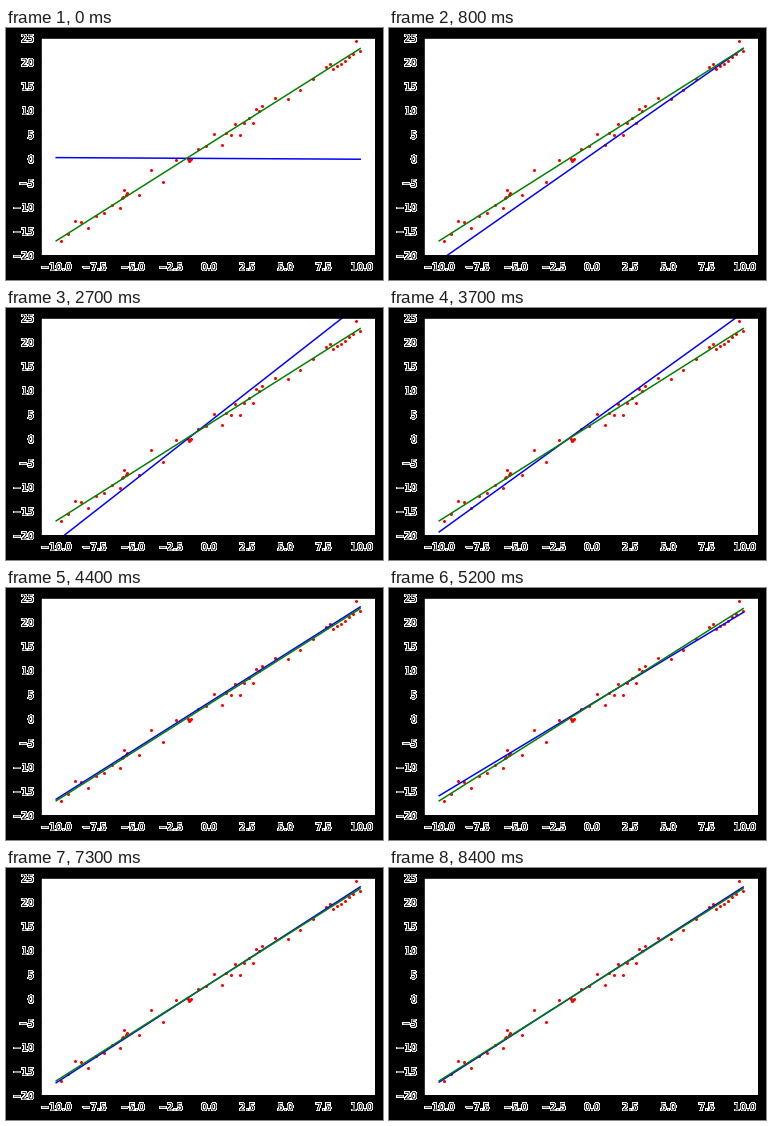
Animation, 377 px wide and 252 px high, one loop 8.5 s. Source, as a matplotlib script:

```python
import numpy as np
import matplotlib.pyplot as plt
from matplotlib.animation import FuncAnimation
from matplotlib.patheffects import withStroke

W, H, DPI = 377, 252, 72
FRAMES, STEP = 85, 100
LEFT, RIGHT, TOP, BOTTOM = 35.0, 369.4, 9.9, 227.34
SLOPE, BIAS = 2.013, 3.05


def samples(n=50):
    """Noisy points around y = 2x + 3, bunched as in a random draw."""
    rank = [0, 4, 8, 13, 18, 21, 25, 32, 35, 40, 49]
    place = [-9.7, -7.9, -5.8, -5.35, -1.4, -1.2, 0.85, 2.9, 3.5, 7.65, 9.9]
    x = np.interp(np.arange(n), rank, place)
    noise = np.random.default_rng(4).normal(0, 1, n)
    return x, 2 * x + 3 + noise


def slope(t):
    # damped swing that slowly quickens
    turns = 0.0895 * t + 0.000155 * t ** 2
    return SLOPE - 2.03 * 0.947 ** t * np.cos(2 * np.pi * turns)


def intercept(t):
    a = 0.093 * t
    return BIAS - 2.99 * 0.9 ** (t / 2) * (np.cos(a) + 0.5 * np.sin(a))


plt.rcParams.update({"font.family": "DejaVu Sans", "font.size": 10})
fig = plt.figure(figsize=(W / DPI, H / DPI), dpi=DPI, facecolor="black")
ax = fig.add_axes([LEFT / W, 1 - BOTTOM / H, (RIGHT - LEFT) / W, (BOTTOM - TOP) / H])
ax.set(xlim=(-10.995, 10.895), ylim=(-20, 25),
       xticks=np.arange(-10, 10.1, 2.5), yticks=np.arange(-20, 26, 5))

# Black digits with a crisp white fringe
fringe = withStroke(linewidth=0.9, foreground="white", antialiased=False)
for label in ax.get_xticklabels() + ax.get_yticklabels():
    label.set_path_effects([fringe])

x = np.arange(-10, 9.95, 0.1)
ax.plot(*samples(), "r.", markersize=4)
fit, = ax.plot(x, 0 * x, color="blue", lw=1.5)
ax.plot(x, 2 * x + 3, color="green", lw=1.5)


def draw(t):
    fit.set_ydata(slope(t) * x + intercept(t))
    return fit,


anim = FuncAnimation(fig, draw, frames=FRAMES, interval=STEP,
                     init_func=lambda: draw(0), repeat=True, repeat_delay=0)
plt.show()
```
